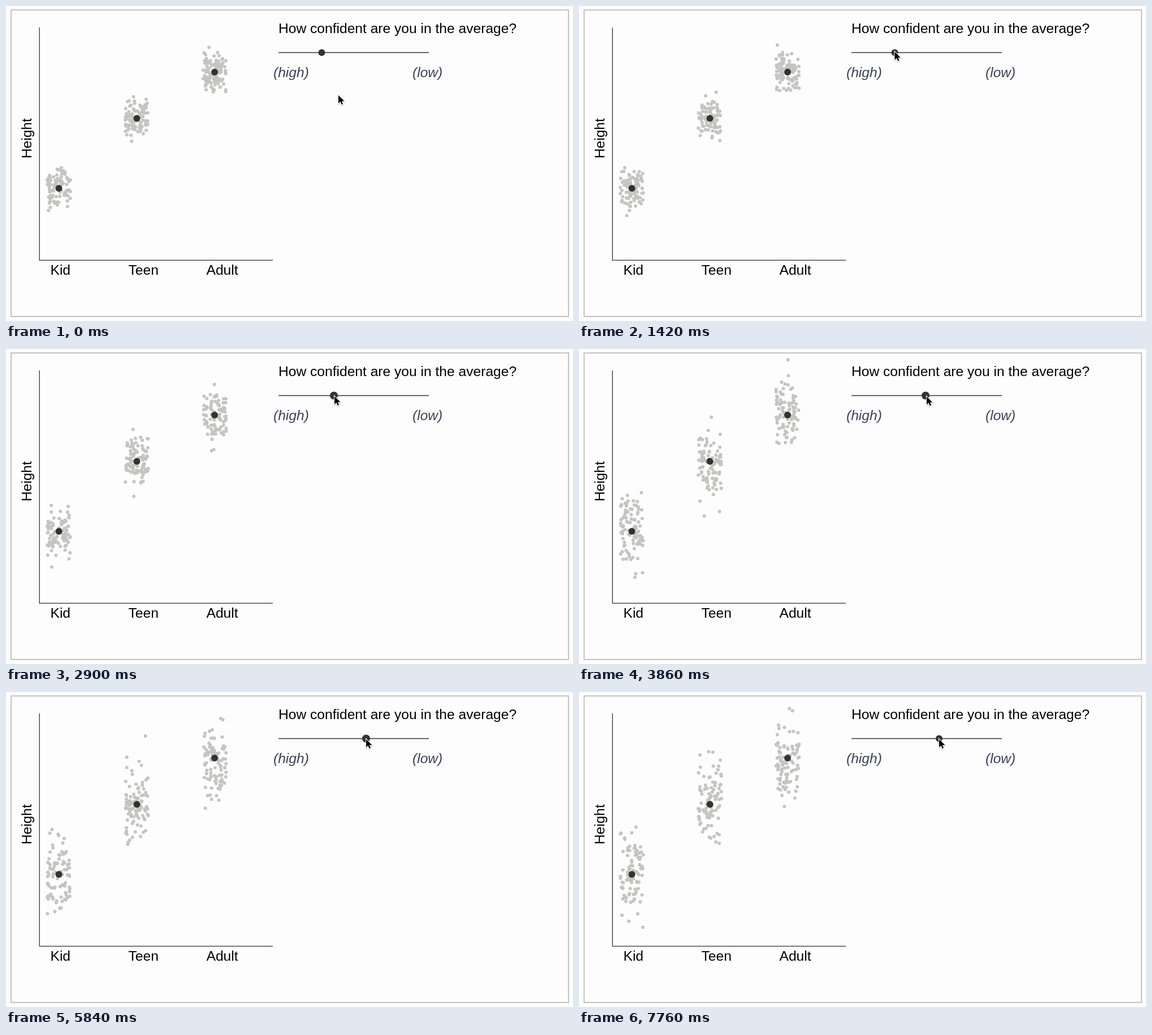
An HTML page with a canvas that plays this animation: 1003x558 px, repeating every 7780 ms.

```html
<!DOCTYPE html>
<html lang="en">
<head>
<meta charset="utf-8">
<style>
  html, body { margin: 0; width: 100%; height: 100%; overflow: hidden; background: #fdfdfe; }
  canvas { display: block; }
</style>
</head>
<body>
<canvas id="stage" width="1003" height="558"></canvas>
<script>
const ctx = document.getElementById('stage').getContext('2d');
const LOOP = 7780, TICK = 20, DOTS = 95, JITTER = 20.5;
const DARK = '#333';
const slider = { left: 482, right: 748, y: 82.5 };
const groups = [
  { label: 'Kid', x: 93.5, y: 323, labelX: 78.5 },
  { label: 'Teen', x: 231.5, y: 199, labelX: 216.5 },
  { label: 'Adult', x: 369, y: 117, labelX: 354.5 }
];

// Keyframes: [time, x] and [time, x, y]
const knobPath = [[1600, 558.5], [2900, 580], [3860, 613], [4580, 626], [5840, 637]];
const cursorPath = [[300, 588, 158], [1250, 558.5, 81], [1600, 558.5, 81],
  [2900, 581, 83.5], [3860, 615, 84], [4580, 626, 84.5], [5840, 637, 83.5]];

function along(path, t) {
  const i = path.findIndex(key => key[0] > t);
  if (i === 0) return path[0].slice(1);
  if (i < 0) return path[path.length - 1].slice(1);
  const a = path[i - 1], b = path[i], k = (t - a[0]) / (b[0] - a[0]);
  return a.slice(1).map((v, j) => v + (b[j + 1] - v) * k);
}

function seededRandom(seed) {
  return () => {
    seed = (seed + 0x6D2B79F5) | 0;
    let n = Math.imul(seed ^ (seed >>> 15), 1 | seed);
    n = (n + Math.imul(n ^ (n >>> 7), 61 | n)) ^ n;
    return ((n ^ (n >>> 14)) >>> 0) / 4294967296;
  };
}

function dot(x, y, r, color) {
  ctx.fillStyle = color;
  ctx.beginPath();
  ctx.arc(x, y, r, 0, Math.PI * 2);
  ctx.fill();
}

function line(...points) {
  ctx.strokeStyle = DARK;
  ctx.lineWidth = 1.3;
  ctx.beginPath();
  points.forEach(([x, y]) => ctx.lineTo(x, y));
  ctx.stroke();
}

function text(str, x, y, color = '#000', style = '') {
  ctx.font = `${style} 24.6px "Liberation Sans", Arial, sans-serif`;
  ctx.fillStyle = color;
  ctx.fillText(str, x, y);
}

function drawFrame() {
  ctx.fillStyle = '#fdfdfe';
  ctx.fillRect(0, 0, 1003, 558);
  ctx.strokeStyle = '#c4c4be';
  ctx.lineWidth = 2;
  ctx.strokeRect(9, 7, 986, 543);

  line([59.2, 38], [59.2, 450.4], [472, 450.4]);
  groups.forEach(g => text(g.label, g.labelX, 475.5));
  ctx.save();
  ctx.translate(45, 270);
  ctx.rotate(-Math.PI / 2);
  text('Height', 0, 0);
  ctx.restore();
  text('How confident are you in the average?', 482, 47.5);
  text('(high)', 473, 126, '#3f3f57', 'italic');
  text('(low)', 719, 126, '#3f3f57', 'italic');
}

function drawSamples(tick, spread) {
  const random = seededRandom(tick * 7919 + 11);
  for (const g of groups) {
    for (let i = 0; i < DOTS; i++) {
      const normal = Math.sqrt(-2 * Math.log(1 - random())) * Math.cos(2 * Math.PI * random());
      dot(g.x + (random() * 2 - 1) * JITTER, g.y + normal * spread, 3, '#c4c4c3');
    }
    dot(g.x, g.y, 6, DARK);
  }
}

function drawCursor(x, y) {
  const arrow = new Path2D('M0 0V14.5L3.4 11.3 5.7 16.6 8 15.6 5.8 10.4H10.4Z');
  ctx.save();
  ctx.translate(x, y);
  ctx.strokeStyle = '#fff';
  ctx.lineWidth = 2;
  ctx.shadowColor = 'rgba(0,0,0,.3)';
  ctx.shadowBlur = 2;
  ctx.shadowOffsetY = 1;
  ctx.stroke(arrow);
  ctx.shadowColor = 'transparent';
  ctx.fillStyle = '#000';
  ctx.fill(arrow);
  ctx.restore();
}

function render(now) {
  const tick = Math.floor((now % LOOP) / TICK), t = tick * TICK;
  const [knobX] = along(knobPath, t);
  const pressed = t > 1500 && t < 6500;
  drawFrame();
  drawSamples(tick, (knobX - slider.left) * 0.23);
  line([slider.left, slider.y], [slider.right, slider.y]);
  dot(knobX, slider.y, pressed ? 7 : 6, DARK);
  drawCursor(...along(cursorPath, t));
  requestAnimationFrame(() => render(performance.now() - start));
}

const start = performance.now();
render(0);
</script>
</body>
</html>
```
